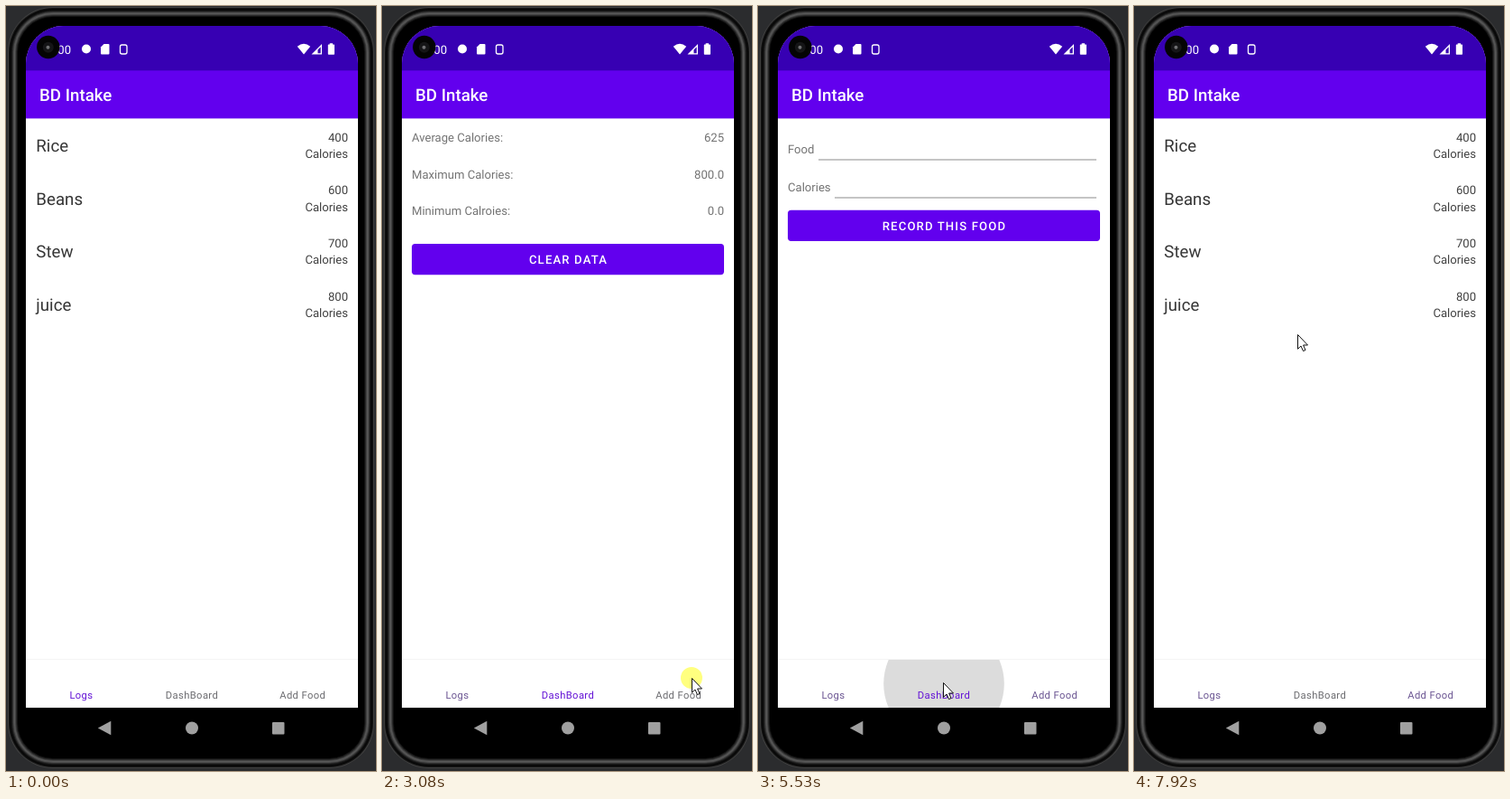
Animation, 410 px wide and 846 px high, one loop 7990 ms. Source, as an HTML page:

```html
<!DOCTYPE html>
<html lang="en">
<head>
<meta charset="utf-8">
<title>Calorie log</title>
<style>
html, body { margin: 0; width: 100%; height: 100%; overflow: hidden; background: #2b2c2e; }
svg { display: block; width: 410px; height: 846px; }
text { font-family: Roboto, sans-serif; font-size: 13.1px; fill: #737373; text-rendering: geometricPrecision; }
.end { text-anchor: end; }
.mid { text-anchor: middle; }
.title { font-size: 18.73px; font-weight: 500; fill: #fff; }
.food { font-size: 18.73px; fill: #363636; }
.kcal { fill: #424242; }
.button { font-weight: 500; letter-spacing: .0893em; fill: #fff; }
.tab { font-size: 11.23px; letter-spacing: .0333em; }
</style>
</head>
<body>
<svg viewBox="0 0 410 846">
  <defs>
    <clipPath id="screen"><path d="M22 776V64a42 42 0 0 1 42-42H348a42 42 0 0 1 42 42V776z"/></clipPath>
    <clipPath id="bar"><path d="M22 723H390V776H22z"/></clipPath>
  </defs>

  <rect width="410" height="846" fill="#2b2c2e"/>
  <g id="body"></g>

  <!-- app -->
  <g clip-path="url(#screen)">
    <rect x="22" y="22" width="368" height="754" fill="#fff"/>
    <rect x="22" y="22" width="368" height="102.400" fill="#6200ee"/>
    <rect x="22" y="22" width="368" height="49.400" fill="#3700b3"/>
    <text class="title" x="37" y="105">BD Intake</text>
    <text x="72" y="53" class="end" style="fill:#fff">5:00</text>
    <g fill="#fff">
      <circle cx="89" cy="47.500" r="5"/>
      <path d="M108.500 42H113.500q1 0 1 1V52.500q0 1-1 1H106q-1 0-1-1V45.500z"/>
      <rect x="126.500" y="43" width="7.500" height="10" rx="2" fill="none" stroke="#fff" stroke-width="1.300"/>
      <path d="M322.800 44.700Q330 39 337.200 44.700L330 53.600z"/>
      <path d="M350 42V53.500H338.500zM348.700 45.300L345.500 48.500V52.200H348.700z" fill-rule="evenodd"/>
      <path d="M358.700 42.500V41.200H362V42.500H363.300q.7 0 .7.700V53q0 .700-.700.700H357.500q-.700 0-.700-.700V43.200q0-.700.700-.700z"/>
    </g>
    <g id="views"></g>
    <rect x="22" y="722" width="368" height="54" fill="#fff"/>
    <rect x="22" y="722" width="368" height="1" fill="#f4f4f4"/>
    <circle id="ripple" clip-path="url(#bar)" fill="#dcdcdc"/>
    <g id="tabs"></g>
  </g>
  <circle cx="46.800" cy="45.500" r="12.700" fill="#040404"/>
  <circle cx="46.800" cy="45.700" r="6" fill="#151517"/>
  <circle cx="46.500" cy="45.700" r="2" fill="#707073"/>

  <!-- system buttons -->
  <g fill="#a0a0a0">
    <path d="M101.800 798.500L116.300 790.700V806.300z"/>
    <circle cx="206" cy="798.500" r="7"/>
    <rect x="295" y="792" width="13.500" height="13.500" rx="1"/>
  </g>

  <g id="pointer">
    <circle id="press" r="12" fill="#ff0" opacity=".5"/>
    <path d="M.5.5V16.300L4 13L6.500 18.600L9 17.500L6.600 12H11.500z" fill="#fff" stroke="#111" stroke-linejoin="round"/>
  </g>
</svg>
<script>
const LOOP = 7990, FADE_DELAY = 380, FADE = 360;
const $ = id => document.getElementById(id);

// Shades of the phone's rim, one pixel each from the outside in
const rim = [64, 22, 8, 10, 24, 48, 76, 88, 68, 42, 20, 0];
$('body').innerHTML = rim.map((c, d) =>
  `<rect x="${2 + d}" y="${1 + d}" width="${406 - 2 * d}" height="${842 - 2 * d}" rx="${50 - d}" fill="rgb(${c},${c},${c})"/>`
).join('');

const label = (x, y, str, cls = '') => `<text x="${x}" y="${y}" class="${cls}">${str}</text>`;
const button = (y, str) =>
  `<rect x="33" y="${y}" width="346" height="34.3" rx="3.7" fill="#6200ee"/>` +
  label(206.500, y + 22, str, 'button mid');
const field = (y, name, x) =>
  label(33, y, name) + `<rect x="${x}" y="${y + 6.500}" width="${375 - x}" height="1" fill="#8c8c8c"/>`;

const logs = () => [['Rice', 400], ['Beans', 600], ['Stew', 700], ['juice', 800]].map(([name, kcal], i) => {
  const y = i * 58.7;
  return label(33.300, 161 + y, name, 'food') + label(379, 149.700 + y, kcal, 'kcal end') +
    label(379, 167.800 + y, 'Calories', 'kcal end');
}).join('');
const stats = average =>
  [['Average Calories:', average], ['Maximum Calories:', '800.0'], ['Minimum Calroies:', '0.0']]
    .map(([name, value], i) => label(33, 150 + i * 40.6, name) + label(379, 150 + i * 40.6, value, 'end'))
    .join('') + button(263, 'CLEAR DATA');
const form = () => field(163, 'Food', 67) + field(205, 'Calories', 85) + button(225.700, 'RECORD THIS FOOD');

const tabX = [83.400, 206, 328.700];
$('views').innerHTML = [logs(), stats(625), form(), stats(781), logs()].map(v => `<g>${v}</g>`).join('');
$('tabs').innerHTML = ['Logs', 'DashBoard', 'Add Food'].map((s, i) => label(tabX[i], 766.300, s, 'tab mid')).join('');
const views = [...$('views').children], tabs = [...$('tabs').children];

// Each tap: highlight on/off, ripple start, tab, pointer place
const taps = [
  { on: 1205, off: 1345, at: 1600, tab: 1, x: 176, y: 763 },
  { on: 3070, off: 3275, at: 3410, tab: 2, x: 343, y: 743 },
  { on: 4960, off: 5105, at: 5240, tab: 1, x: 205, y: 748 },
  { on: 6750, off: 6890, at: 6770, tab: 0, x: 51, y: 760 }
];
// Pointer moves: start, end, from, to
const moves = [
  [400, 1190, 240, 848, 176, 763],
  [2050, 2800, 176, 763, 343, 743],
  [4280, 4930, 343, 743, 205, 748],
  [6050, 6560, 205, 748, 51, 760],
  [7530, 7915, 51, 760, 181, 363]
];
const GRAY = '#6c6c70', MIXED = '#6b5592', ACTIVE = '#6414d6';
const tabColors = [
  [ACTIVE, GRAY, GRAY],
  [MIXED, ACTIVE, GRAY],
  [MIXED, GRAY, '#8046cc'],
  [MIXED, ACTIVE, MIXED],
  [MIXED, GRAY, MIXED]
];

const part = (t, start, length) => Math.min(1, Math.max(0, (t - start) / length));
const easeInOut = k => k * k * (3 - 2 * k);
const easeOut = k => 1 - (1 - k) ** 2;
const mix = (a, b, k) => a + (b - a) * k;
const set = (el, attrs) => { for (const k in attrs) el.setAttribute(k, attrs[k]); };

function draw(t) {
  const shown = taps.map(p => part(t, p.at + FADE_DELAY, FADE));
  views.forEach((v, i) => {
    const inward = i ? shown[i - 1] : 1, outward = i < 4 ? shown[i] : 0;
    v.style.opacity = inward * (1 - outward);
  });

  const picked = taps.filter(p => t >= p.at + 130).length;
  tabs.forEach((el, i) => { el.style.fill = tabColors[picked][i]; });

  const tap = taps.filter(p => t >= p.at).pop();
  if (tap) {
    const k = easeOut(part(t, tap.at, 225));
    set($('ripple'), {
      cx: mix(tap.x, tabX[tap.tab], k), cy: mix(tap.y, 749.500, k), r: mix(16, 66.800, k),
      opacity: part(t, tap.at, 75) * (1 - part(t, tap.at + FADE_DELAY, 220))
    });
  } else set($('ripple'), { opacity: 0 });

  const [start, end, x0, y0, x1, y1] = moves.filter(m => t >= m[0]).pop() || moves[0];
  const k = easeInOut(part(t, start, end - start));
  set($('pointer'), {
    transform: `translate(${Math.round(mix(x0, x1, k))} ${Math.round(mix(y0, y1, k))})`,
    visibility: t < 450 ? 'hidden' : 'visible'
  });
  $('press').style.display = taps.some(p => t >= p.on && t < p.off) ? '' : 'none';
}

const begin = performance.now();
function tick() {
  draw((performance.now() - begin) % LOOP);
  requestAnimationFrame(tick);
}
tick();
</script>
</body>
</html>
```
